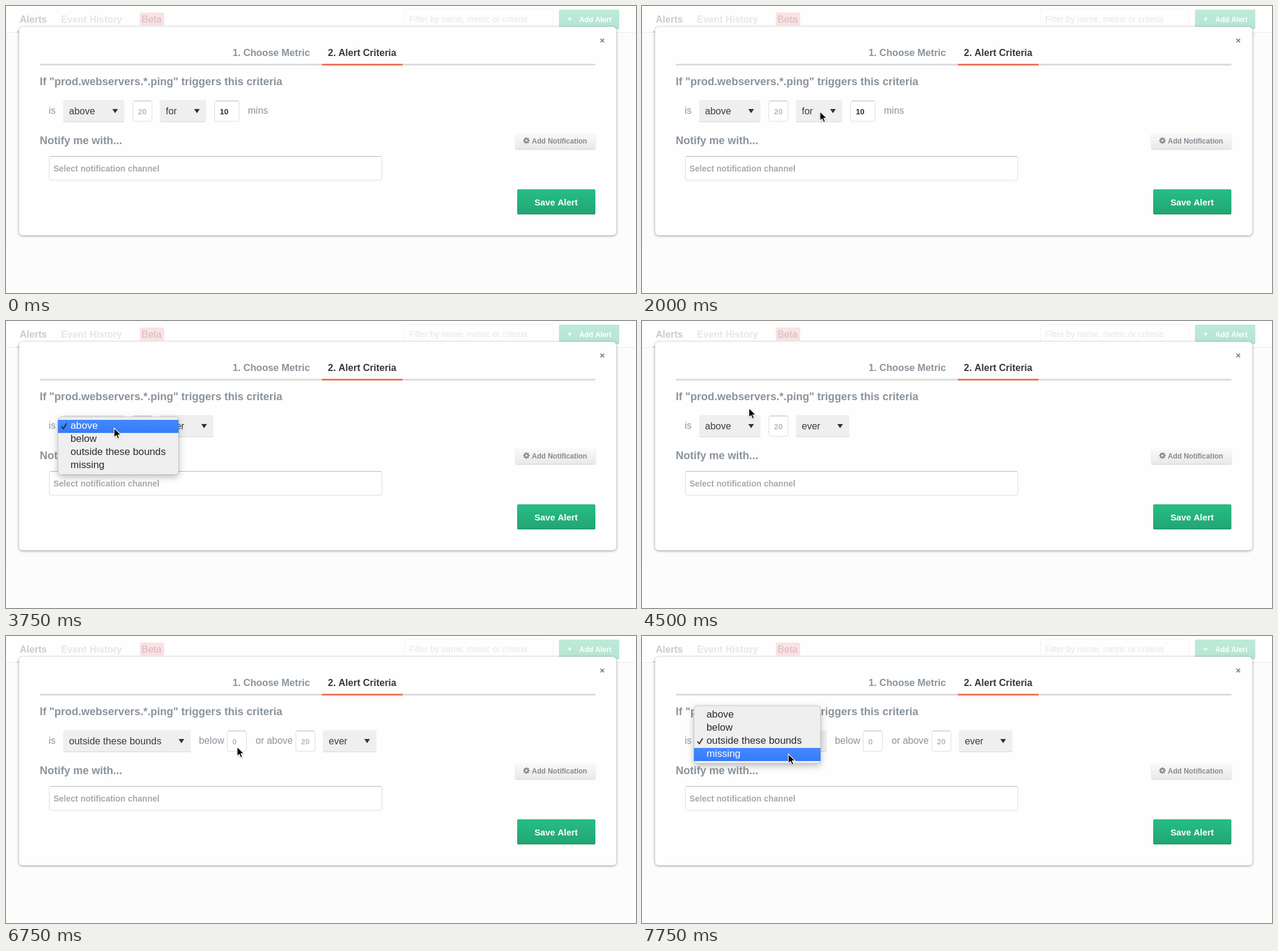
An HTML page with a canvas that plays this animation: 1055x482 px, repeating every 8 s.

```html
<!DOCTYPE html>
<html lang="en">
<head>
<meta charset="utf-8">
<title>Alert criteria</title>
<style>
html, body { margin: 0; width: 100%; height: 100%; overflow: hidden; background: #fcfcfc; }
canvas { display: block; }
</style>
</head>
<body>
<canvas id="stage" width="1055" height="482"></canvas>
<script>
const ctx = document.getElementById('stage').getContext('2d');
const LOOP = 8000;
const BEAT = 250;
const ROW = 22;
const FONT = '"Liberation Sans", Arial, sans-serif';
const GREY = '#8b949c';
const CHECKS = ['above', 'below', 'outside these bounds', 'missing'];
const SPANS = ['for', 'ever'];

// Pointer waypoints: time, x, y
const PATH = [
  [500, 418, 206], [750, 230, 153], [1000, 147, 209], [1500, 300, 196],
  [1750, 300, 196], [2000, 297, 177], [2750, 292, 197], [3000, 273, 109],
  [3500, 180, 172], [4250, 180, 195], [4500, 178, 146], [5500, 175, 210],
  [6500, 175, 210], [6750, 386, 186], [7250, 247, 178], [7750, 244, 198]
];

const within = (t, from, to) => t >= from && t < to;

function pointerAt(t) {
  const i = PATH.findIndex(p => p[0] >= t);
  const [t2, x2, y2] = PATH[i];
  const [t1, x1, y1] = PATH[Math.max(i - 1, 0)];
  const k = t2 > t1 ? (t - t1) / (t2 - t1) : 1;
  return [x1 + (x2 - x1) * k, y1 + (y2 - y1) * k];
}

function text(str, x, y, size, color, weight = '') {
  ctx.font = `${weight} ${size}px ${FONT}`;
  ctx.fillStyle = color;
  ctx.fillText(str, x, y);
}

function bold(str, x, y, size, color) {
  text(str, x, y, size, color, 'bold');
}

function rect(x, y, w, h, color) {
  ctx.fillStyle = color;
  ctx.fillRect(x, y, w, h);
}

function box(x, y, w, h, r, fill, stroke) {
  ctx.beginPath();
  ctx.roundRect(x, y, w, h, r);
  ctx.fillStyle = fill;
  ctx.fill();
  if (stroke) {
    ctx.strokeStyle = stroke;
    ctx.lineWidth = 1;
    ctx.stroke();
  }
}

function shadowed(color, blur, dy, draw) {
  ctx.save();
  ctx.shadowColor = color;
  ctx.shadowBlur = blur;
  ctx.shadowOffsetY = dy;
  draw();
  ctx.restore();
}

function fade(y1, y2, top, bottom) {
  const g = ctx.createLinearGradient(0, y1, 0, y2);
  g.addColorStop(0, top);
  g.addColorStop(1, bottom);
  return g;
}

function shape(points, fill) {
  ctx.beginPath();
  points.forEach(([x, y]) => ctx.lineTo(x, y));
  ctx.closePath();
  ctx.fillStyle = fill;
  ctx.fill();
}

function page() {
  rect(0, 0, 1055, 482, '#fcfcfc');
  rect(0, 0, 1055, 44, '#fefefe');
  rect(0, 44, 1055, 1, '#ececec');
  rect(0, 45, 1, 360, '#f6f6f6');
  rect(18, 42, 50, 3, '#fbd3ca');
  bold('Alerts', 23, 28, 16, '#cbcbcb');
  bold('Event History', 92, 28, 15.9, '#e5e7e8');
  box(224, 11, 41, 22, 3, '#fbe2e4');
  text('Beta', 227, 28, 16.4, '#d3bbbd');
  box(667.5, 5.5, 249, 34, 3, '#fefefe', '#f3f3f3');
  text('Filter by name, metric or criteria', 675, 27, 14.1, '#e6e6e6');
  box(926, 6, 101, 33, 2, fade(6, 39, '#bdebd9', '#b7e4d2'));
  bold('+', 940, 26, 13, '#fff');
  bold('Add Alert', 960, 27, 12, '#fff');
}

function gear(x, y) {
  ctx.save();
  ctx.translate(x, y);
  ctx.strokeStyle = '#858c92';
  ctx.lineWidth = 2.4;
  ctx.beginPath();
  ctx.arc(0, 0, 3, 0, Math.PI * 2);
  ctx.stroke();
  for (let i = 0; i < 8; i++) {
    ctx.rotate(Math.PI / 4);
    rect(3.5, -1, 2, 2, '#858c92');
  }
  ctx.restore();
}

function cross(x, y, r) {
  ctx.strokeStyle = '#777';
  ctx.lineWidth = 1.7;
  ctx.beginPath();
  for (const s of [-1, 1]) {
    ctx.moveTo(x - r, y - r * s);
    ctx.lineTo(x + r, y + r * s);
  }
  ctx.stroke();
}

function dialog() {
  shadowed('rgba(0,0,0,.4)', 4, 1, () => box(22, 35, 1000, 350, 6, '#fefefe'));
  cross(998.5, 58, 3);

  bold('1. Choose Metric', 379.5, 84, 16.2, GREY);
  bold('2. Alert Criteria', 539, 84, 16, '#383838');
  rect(57, 97, 930, 3, '#dcdcdc');
  rect(529, 97, 135, 3, '#ec765c');
  bold('If "prod.webservers.*.ping" triggers this criteria', 56.5, 133, 18, GREY);
  bold('Notify me with...', 56.5, 232, 18, GREY);

  shadowed('rgba(0,0,0,.2)', 2, 1, () =>
    box(853, 214, 134, 26, 2, fade(214, 240, '#fafafa', '#e9e9e9')));
  gear(871.5, 226);
  bold('Add Notification', 880.5, 231, 12, '#858c92');

  field(72, 252, 558, 41);
  bold('Select notification channel', 79.5, 278, 14, '#a9a9a9');

  box(856, 308, 131, 42, 2, fade(308, 350, '#27bd86', '#22a573'));
  rect(857, 308, 129, 1, '#1fa975');
  rect(857, 349, 129, 1, '#1b8c60');
  bold('Save Alert', 885, 335, 14.8, '#fff');
}

function field(x, y, w, h) {
  box(x + .5, y + .5, w - 1, h - 1, 2.5, '#fff', '#dcdfe3');
  rect(x + 2, y, w - 4, 1, '#b1b8c2');
}

function input(x, w, value, color) {
  field(x, 159, w, 35);
  bold(value, x + 9, 182, 13, color);
}

function select(x, w, label, size = 16) {
  shadowed('rgba(0,0,0,.16)', 1, 1, () => box(x, 158, w, 36, 3, '#efefef'));
  text(label, x + 9.5, 182, size, '#3d3d3d');
  const a = x + w - 20;
  shape([[a, 173], [a + 9.5, 173], [a + 4.75, 180]], '#333');
}

// Returns the left edge of the span select.
function criteria(check, span) {
  text('is', 71.5, 181, 16, GREY);
  let x;
  if (check === 2) {
    select(96, 213, CHECKS[2], 16.3);
    text('below', 323, 181, 16.3, GREY);
    input(370, 33, '0', '#bbb');
    text('or above', 418, 181, 16, GREY);
    input(485, 33, '20', '#bbb');
    x = 531;
  } else {
    const w = 102 - check;
    select(96, w, CHECKS[check]);
    input(110 + w, 33, '20', '#bbb');
    x = 156 + w;
  }
  if (span === 0) {
    select(x, 77, SPANS[0]);
    input(x + 91, 42, '10', '#333');
    text('mins', x + 147, 181, 16, GREY);
  } else {
    select(x, 89, SPANS[1]);
  }
  return x;
}

function tick(x, y) {
  ctx.strokeStyle = '#222';
  ctx.lineWidth = 1.8;
  ctx.beginPath();
  ctx.moveTo(x, y + 1);
  ctx.lineTo(x + 3, y + 5);
  ctx.lineTo(x + 8.5, y - 4);
  ctx.stroke();
}

// The checked row sits over the closed select; the row under hoverY lights up.
function menu(x, w, items, checked, hoverY) {
  const top = 161 - checked * ROW;
  const h = items.length * ROW + 9;
  const active = Math.floor((hoverY - top - 5) / ROW);
  shadowed('rgba(0,0,0,.26)', 12, 4, () => box(x, top, w, h, 5, '#efefef'));
  box(x, top, w, h, 5, '#efefef', 'rgba(0,0,0,.16)');
  items.forEach((item, i) => {
    const y = top + 5 + i * ROW;
    const lit = i === active;
    if (lit) rect(x, y, w, ROW, fade(y, y + ROW, '#4388fd', '#357cfb'));
    text(item, x + 21, y + 15, 16.8, lit ? '#fff' : '#2b2b2b');
    if (i === checked) tick(x + 6, y + 10);
  });
}

function pointer(x, y) {
  const outline = [[0, 0], [0, 16], [3.7, 12.7], [6.2, 18.2], [8.9, 17], [6.5, 11.6], [11.5, 11.6]];
  ctx.save();
  ctx.translate(x + 1, y);
  ctx.lineJoin = 'round';
  shadowed('rgba(0,0,0,.35)', 3, 1, () => shape(outline, '#000'));
  ctx.strokeStyle = '#fff';
  ctx.lineWidth = 1.2;
  ctx.stroke();
  ctx.restore();
}

function draw(time) {
  const t = Math.floor(time / BEAT) * BEAT;
  const check = (t >= 4750) + (t >= 6250);
  const span = +(t >= 3250);
  const checkOpen = within(t, 3750, 4500) || within(t, 5000, 6000) || t >= 7500;
  const spanOpen = within(t, 2250, 3000);

  page();
  dialog();
  const spanX = criteria(check, span);
  if (t < 500) return;

  // The highlight trails the pointer by one beat, except where it rests.
  const hoverY = t === LOOP - BEAT ? pointerAt(t)[1] : pointerAt(Math.min(t, 5500 + (t >= 6000) * LOOP) - BEAT)[1];
  if (checkOpen) menu(87, check === 2 ? 212 : 202, CHECKS, check, hoverY);
  if (spanOpen) menu(spanX - 9, 76, SPANS, span, hoverY);
  pointer(...pointerAt(t));
}

const start = performance.now();
function loop() {
  draw((performance.now() - start) % LOOP);
  requestAnimationFrame(loop);
}
loop();
</script>
</body>
</html>
```
